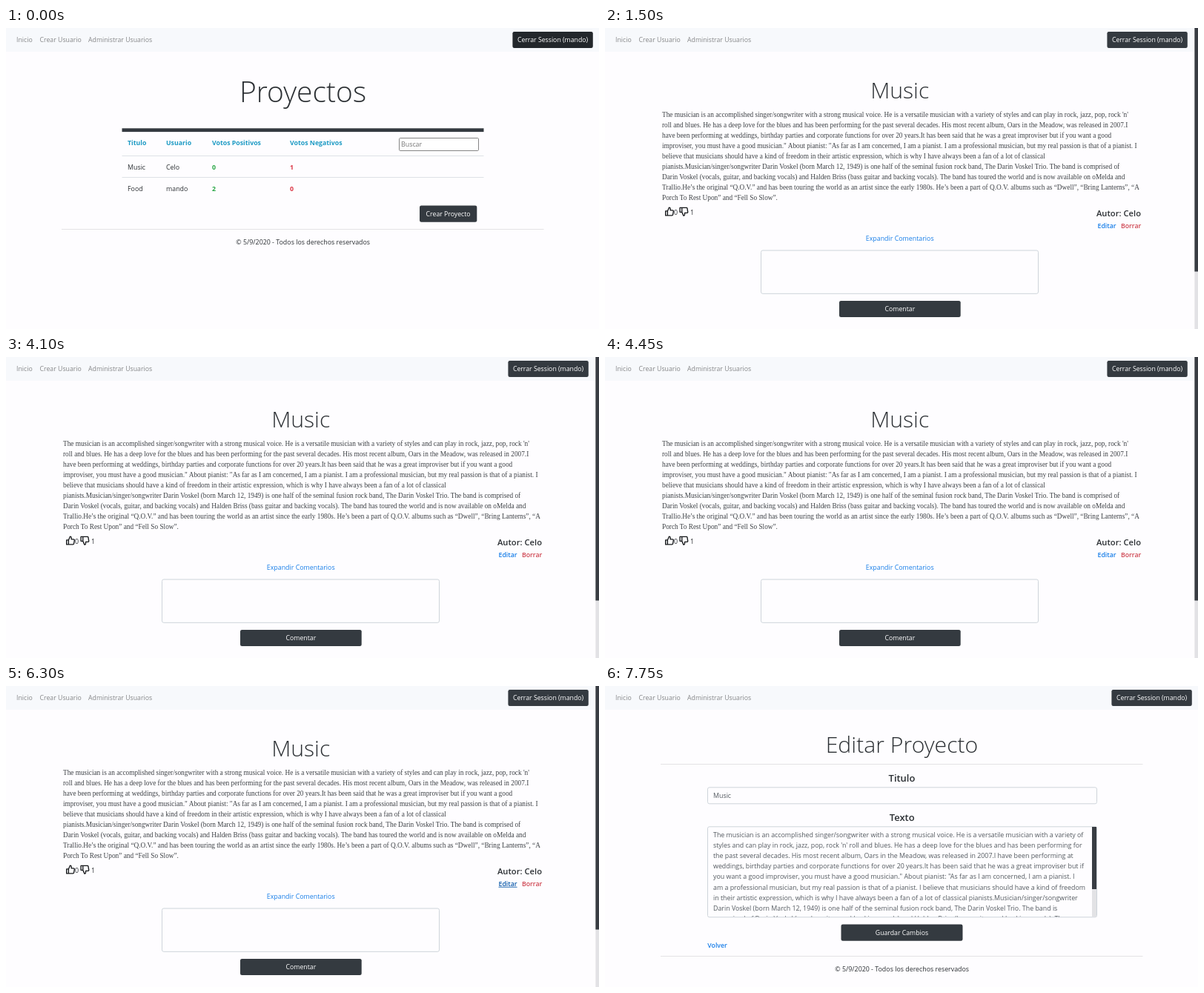
Recreate the animation shown at these times as an HTML page. Size 800 px wide and 406 px high, loop 8000 ms.

```html
<!DOCTYPE html>
<html lang="es">
<head>
<meta charset="utf-8">
<title>Proyectos</title>
<style>
html, body { margin: 0; width: 100%; height: 100%; overflow: hidden; background: #fefdff; }
svg { display: block; width: 800px; height: 406px; }
text { font: 400 8.85px "Open Sans", "Noto Sans", sans-serif; fill: #2b2f33; white-space: pre; }
.mid { text-anchor: middle; }
.end { text-anchor: end; }
.nav text { fill: rgba(0, 0, 0, .46); font-size: 8.75px; }
.title { font-weight: 300; font-size: 30.2px; }
.big { font-size: 39px; }
.label { font-weight: 600; font-size: 13px; }
.author { font-weight: 600; font-size: 11.2px; }
.head text, .vote { font-weight: 700; font-size: 8.75px; }
.head text { fill: #1e9bc4; }
.up { fill: #28a745; }
.down { fill: #dc3545; }
.link { fill: #187ee8; }
.strong { font-weight: 600; font-size: 8.75px; }
.danger { fill: #cf4450; }
.field { fill: #53595f; }
.hint { fill: #757575; }
.prose { font: 9.29px "Liberation Serif", "Noto Serif", serif; fill: #3e4246; }
.btn { fill: #343a40; }
.onbtn { fill: #fff; font-size: 8.72px; }
.rule { fill: rgba(0, 0, 0, .1); }
.row { fill: #dee2e6; }
.box { fill: #fefdff; stroke: #ced4da; }
.track { fill: #e2e2e5; }
.thumb { fill: #383c42; }
.icon { fill: none; stroke: #16181b; stroke-width: 2.5; stroke-linejoin: round; }

.list, .view, .edit, .shift, .del, .mod, .bar, .area { animation: 8s step-end infinite; }
.list { animation-name: list; }
.view { animation-name: view; }
.edit { animation-name: edit; }
.shift { animation-name: shift; }
.del { animation-name: del; }
.mod { animation-name: mod; }
.bar { animation-name: bar; }
.area { animation-name: area; }
.logout { animation: logout 8s linear infinite; }

@keyframes list { 0% { opacity: 1; } 18.75%, 100% { opacity: 0; } }
@keyframes view { 0% { opacity: 0; } 18.75% { opacity: 1; } 88.75%, 100% { opacity: 0; } }
@keyframes edit { 0% { opacity: 0; } 88.75%, 100% { opacity: 1; } }
@keyframes shift {
  0%, 88.75%, 100% { transform: translateX(0); }
  18.75% { transform: translateX(-6px); }
}
@keyframes logout {
  0%, .5% { fill: #23272b; }
  2.5%, 61.6% { fill: #343a40; }
  64.2%, 69.1% { fill: #23272b; }
  71.2%, 100% { fill: #343a40; }
}
@keyframes del {
  0%, 46.25%, 50.625%, 100% { fill: #cf4450; text-decoration: none; }
  45%, 50% { fill: #b02a37; text-decoration: underline; }
}
@keyframes mod {
  0%, 48.125%, 100% { fill: #187ee8; text-decoration: none; }
  46.875%, 78.75% { fill: #0f5cab; text-decoration: underline; }
}
@keyframes bar {
  0%, 55.625%, 100% { fill: #383c42; }
  51.875% { fill: #23272b; }
}
@keyframes area {
  0%, 89.375%, 100% { stroke: #ced4da; }
  88.75% { stroke: #62666b; }
}
</style>
</head>
<body>
<svg viewBox="0 0 800 406">
  <defs>
    <clipPath id="inside"><rect x="139" y="190" width="518" height="121.5"/></clipPath>
    <path id="hand" d="M14 9V5a3 3 0 0 0-3-3l-4 9v11h11.3a2 2 0 0 0 2-1.7l1.4-9a2 2 0 0 0-2-2.3zM7 22H2V11h5"/>
  </defs>

  <rect width="800" height="32" fill="#f7f9fc"/>
  <g class="nav">
    <text x="14" y="19.3">Inicio</text>
    <text x="45.5" y="19.3">Crear Usuario</text>
    <text x="111" y="19.3">Administrar Usuarios</text>
  </g>
  <g class="shift">
    <rect class="btn logout" x="683.4" y="5" width="108.4" height="22" rx="2.3"/>
    <text class="mid onbtn" x="737.5" y="19.3">Cerrar Session (mando)</text>
  </g>

  <g class="list">
    <text class="title big mid" x="400.5" y="100">Proyectos</text>
    <rect class="btn" x="156.5" y="135.3" width="488" height="4.8"/>
    <g class="head">
      <text x="164" y="158.3">Titulo</text>
      <text x="216" y="158.3">Usuario</text>
      <text x="278" y="158.3">Votos Positivos</text>
      <text x="383" y="158.3">Votos Negativos</text>
    </g>
    <rect x="530.5" y="148.5" width="107" height="17" rx="1.2" fill="#fff" stroke="#858585"/>
    <text class="hint" x="533" y="160.2">Buscar</text>
    <rect class="row" x="156.5" y="172" width="488" height="1"/>
    <text x="164" y="190.7">Music</text>
    <text x="216" y="190.7">Celo</text>
    <text class="vote up" x="278" y="190.7">0</text>
    <text class="vote down" x="383" y="190.7">1</text>
    <rect class="row" x="156.5" y="201" width="488" height="1"/>
    <text x="164" y="219.7">Food</text>
    <text x="216" y="219.7">mando</text>
    <text class="vote up" x="278" y="219.7">2</text>
    <text class="vote down" x="383" y="219.7">0</text>
    <rect class="btn" x="558" y="239.4" width="77.3" height="22.4" rx="2.3"/>
    <text class="mid onbtn" x="596.6" y="253.8">Crear Proyecto</text>
    <rect class="rule" x="75" y="271" width="650.5" height="1"/>
    <text class="mid" x="400.7" y="291.5">© 5/9/2020 - Todos los derechos reservados</text>
  </g>

  <g class="view">
    <text class="title mid" x="397.7" y="94.8">Music</text>
    <text class="prose" id="story"></text>
    <use href="#hand" class="icon" transform="translate(80.6 241) scale(.54)"/>
    <text x="93" y="252">0</text>
    <use href="#hand" class="icon" transform="translate(100 254.3) scale(.54 -.54)"/>
    <text x="115" y="252">1</text>
    <text class="author end" x="723" y="253.5">Autor: Celo</text>
    <text class="strong link mod" x="664.5" y="269.8">Editar</text>
    <text class="strong danger del end" x="723.3" y="269.8">Borrar</text>
    <text class="link mid" x="397.7" y="287">Expandir Comentarios</text>
    <rect class="box" x="210.5" y="300" width="374" height="58.3" rx="2.3"/>
    <rect class="btn" x="316" y="368" width="163.7" height="22" rx="2.3"/>
    <text class="mid onbtn" x="397.9" y="382.4">Comentar</text>
    <rect class="track" x="795.4" width="4.6" height="406"/>
    <rect class="thumb bar" x="795.4" width="4.6" height="328.5"/>
  </g>

  <g class="edit">
    <text class="title mid" x="400.5" y="90">Editar Proyecto</text>
    <rect class="rule" x="75" y="105" width="650.5" height="1"/>
    <text class="label mid" x="400.5" y="129.3">Titulo</text>
    <rect class="box" x="138.5" y="136.8" width="525" height="22" rx="2.3"/>
    <text class="field" x="146" y="151.3">Music</text>
    <text class="label mid" x="400.7" y="182.3">Texto</text>
    <rect class="box area" x="138.5" y="189.8" width="525" height="122" rx="2.3"/>
    <g clip-path="url(#inside)"><text class="field" id="draft"></text></g>
    <rect class="track" x="657" y="190" width="6" height="121.5"/>
    <rect class="thumb" x="657" y="190" width="6" height="84"/>
    <rect class="btn" x="318.5" y="321.4" width="164" height="22.3" rx="2.3"/>
    <text class="mid onbtn" x="400.5" y="335.9">Guardar Cambios</text>
    <text class="strong link" x="138.3" y="353.2">Volver</text>
    <rect class="rule" x="75" y="364" width="650.5" height="1"/>
    <text class="mid" x="400.7" y="384.8">© 5/9/2020 - Todos los derechos reservados</text>
  </g>
</svg>
<script>
const LINE = 14.06;

const story = `The musician is an accomplished singer/songwriter with a strong musical voice. He is a versatile musician with a variety of styles and can play in rock, jazz, pop, rock 'n'
roll and blues. He has a deep love for the blues and has been performing for the past several decades. His most recent album, Oars in the Meadow, was released in 2007.I
have been performing at weddings, birthday parties and corporate functions for over 20 years.It has been said that he was a great improviser but if you want a good
improviser, you must have a good musician." About pianist: "As far as I am concerned, I am a pianist. I am a professional musician, but my real passion is that of a pianist. I
believe that musicians should have a kind of freedom in their artistic expression, which is why I have always been a fan of a lot of classical
pianists.Musician/singer/songwriter Darin Voskel (born March 12, 1949) is one half of the seminal fusion rock band, The Darin Voskel Trio. The band is comprised of
Darin Voskel (vocals, guitar, and backing vocals) and Halden Briss (bass guitar and backing vocals). The band has toured the world and is now available on oMelda and
Trallio.He’s the original “Q.O.V.” and has been touring the world as an artist since the early 1980s. He’s been a part of Q.O.V. albums such as “Dwell”, “Bring Lanterns”, “A
Porch To Rest Upon” and “Fell So Slow”.`;

const draft = `The musician is an accomplished singer/songwriter with a strong musical voice. He is a versatile musician with a variety of
styles and can play in rock, jazz, pop, rock 'n' roll and blues. He has a deep love for the blues and has been performing for
the past several decades. His most recent album, Oars in the Meadow, was released in 2007.I have been performing at
weddings, birthday parties and corporate functions for over 20 years.It has been said that he was a great improviser but if
you want a good improviser, you must have a good musician." About pianist: "As far as I am concerned, I am a pianist. I
am a professional musician, but my real passion is that of a pianist. I believe that musicians should have a kind of freedom
in their artistic expression, which is why I have always been a fan of a lot of classical pianists.Musician/singer/songwriter
Darin Voskel (born March 12, 1949) is one half of the seminal fusion rock band, The Darin Voskel Trio. The band is
comprised of Darin Voskel (vocals, guitar, and backing vocals) and Halden Briss (bass guitar and backing vocals). The`;

function setLines(id, copy, x, y) {
  const node = document.getElementById(id);
  copy.split("\n").forEach((line, i) => {
    const span = document.createElementNS("http://www.w3.org/2000/svg", "tspan");
    span.setAttribute("x", x);
    span.setAttribute("y", y + i * LINE);
    span.textContent = line;
    node.append(span);
  });
}

setLines("story", story, 77, 120);
setLines("draft", draft, 146, 204.2);
</script>
</body>
</html>
```
